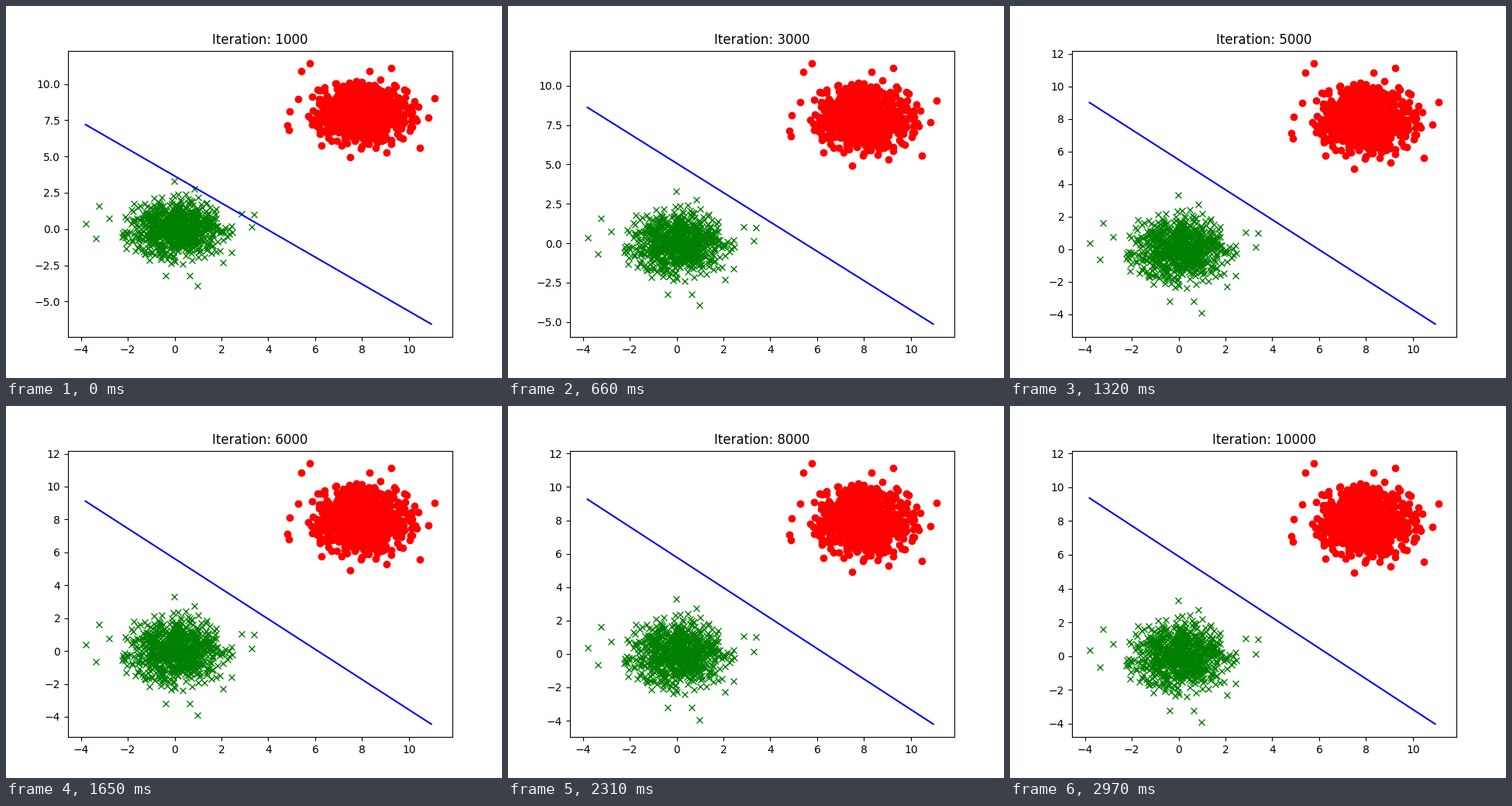
A matplotlib script that plays this animation: 640x480 px, repeating every 5.3 s.

```python
import numpy as np
import matplotlib.pyplot as plt
from matplotlib.animation import FuncAnimation

STEP = 20            # ms per tick
LOOP = 5300          # ms per loop
HOLD = 330           # ms per training snapshot
SNAPSHOTS = 10
X_MIN, X_MAX, Y_MAX = -3.802, 11.109, 11.395
LINE_X = [X_MIN, 10.95]

# The most visible stray points of each class
GREEN_STRAYS = [(X_MIN, .36), (-3.36, -.66), (-3.22, 1.6), (-2.8, .74),
                (-.02, 3.3), (.84, 2.75), (2.87, 1.05), (3.4, 1.0),
                (3.29, .13), (2.44, -1.62), (2.08, -2.3), (.65, -3.22),
                (-.38, -3.22), (.98, -3.93)]
RED_STRAYS = [(5.76, Y_MAX), (5.4, 10.86), (5.27, 8.98), (4.9, 8.12),
              (4.8, 7.12), (4.87, 6.8), (8.31, 10.86), (9.24, 11.12),
              (X_MAX, 9.03), (10.82, 7.66), (10.45, 5.58), (9.04, 5.3),
              (7.48, 4.93), (6.26, 5.76)]


def cloud(center, strays, seed):
    """Seeded normal core plus its strays, as x and y rows."""
    core = np.random.default_rng(seed).normal(size=(760, 2))
    core = core[np.hypot(*core.T) < 2.5] + center
    return np.vstack([core, strays]).T


def boundary_ends(n):
    """Heights of the line's ends, settling by power laws."""
    return 9.98 - 2.78 * n ** -0.65, -1.49 - 5.06 * n ** -0.3


def padded(low, high):
    pad = 0.05 * (high - low)
    return low - pad, high + pad


fig, ax = plt.subplots(figsize=(6.4, 4.8), dpi=100)
ax.plot(*cloud(0, GREEN_STRAYS, 3), "gx")
ax.plot(*cloud(8, RED_STRAYS, 8), "ro")
boundary, = ax.plot([], [], "b-")
title = ax.set_title("")
ax.set_xlim(padded(X_MIN, X_MAX))


def update(i):
    n = min((i * STEP + STEP // 2) // HOLD + 1, SNAPSHOTS)
    left, right = boundary_ends(n)
    boundary.set_data(LINE_X, [left, right])
    ax.set_ylim(padded(right, Y_MAX))
    title.set_text(f"Iteration: {n * 1000}")
    return boundary, title


anim = FuncAnimation(fig, update, frames=LOOP // STEP, interval=STEP,
                     init_func=lambda: update(0), repeat=True, repeat_delay=0)
plt.show()
```
